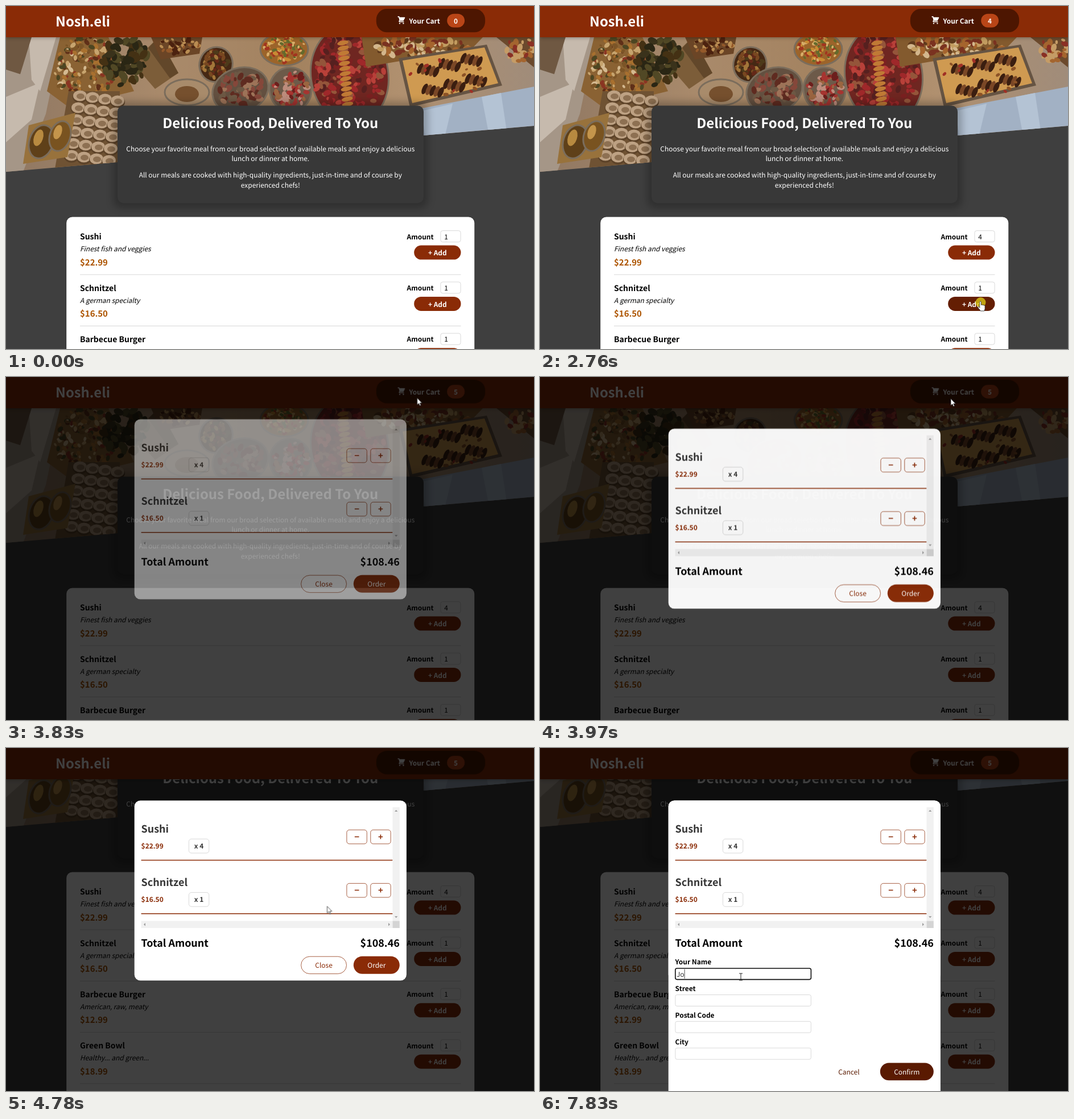
These frames come from a looping animation (928 px wide and 604 px high, 8000 ms). An HTML page:

```html
<!DOCTYPE html>
<html lang="en">
<head>
<meta charset="utf-8">
<title>Nosh.eli</title>
<style>
html, body { margin: 0; width: 928px; height: 604px; overflow: hidden; background: #3f3f3f; }
svg { display: block; }
text {
  font: 11.95px "Noto Sans CJK JP", "Noto Sans JP", "Noto Sans CJK SC", "Noto Sans", sans-serif;
  text-rendering: geometricPrecision; white-space: pre;
}
.b { font-weight: 700; }
.w { fill: #fff; }
.mid { text-anchor: middle; }
.end { text-anchor: end; }
.rust { fill: #8a2b06; }
.grey { fill: #363636; }
.h1 { font-size: 23.9px; font-weight: 700; }
.h2 { font-size: 17.92px; font-weight: 700; }
.h3 { font-size: 13.98px; font-weight: 700; }
.lg { font-size: 14.94px; font-weight: 700; }
.it { font-style: italic; }
.price { fill: #ad5502; }
.field { fill: #fff; stroke: #ccc; stroke-width: .75; }
.ring { fill: none; stroke: #101010; stroke-width: 1.6; }
.line { fill: none; stroke: #8a2b06; stroke-width: .75; }

/* one shared 8 s clock */
.t { animation: 8s step-end infinite; }
#scroll { animation: scroll 8s ease-in-out infinite; }
#modal { animation: drop 8s ease-out infinite; }
#cart { transform-origin: 746.5px 25.6px; animation: bump 8s ease-out infinite; }
#pointer { animation: move 8s ease-in-out infinite; }

@keyframes scroll { 0%, 55.6% { transform: none } 59.7%, 100% { transform: translateY(-153px) } }
@keyframes drop {
  0%, 46.7% { opacity: 0; transform: translateY(-35.9px) }
  50.2%, 100% { opacity: 1; transform: none }
}
@keyframes bump {
  0%, 35.75% { transform: scale(1) }
  36.125% { transform: scale(.9) }
  36.875% { transform: scale(1.1) }
  37.625% { transform: scale(1.15) }
  39.5%, 100% { transform: scale(1) }
}
@keyframes move {
  0% { transform: translate(960px, 660px); animation-timing-function: step-end }
  .375% { transform: translate(893px, 590px) }
  5.4% { transform: translate(784px, 440px) }
  8.875%, 21.75% { transform: translate(792px, 398px) }
  24.5%, 28.5% { transform: translate(772px, 434px) }
  31.375%, 36.5% { transform: translate(774px, 521px) }
  43.75%, 45.5% { transform: translate(726px, 30px) }
  46.7% { transform: translate(723px, 36px) }
  49.6%, 50% { transform: translate(722px, 38px) }
  55.25%, 67% { transform: translate(564.5px, 278.5px) }
  70.6%, 75.5% { transform: translate(649px, 384px) }
  77.1% { transform: translate(600px, 350px) }
  82.25%, 100% { transform: translate(353px, 403px) }
}
@keyframes arrow {
  0%, 7.1%, 29.3%, 37.6%, 46.7%, 72.5% { opacity: 1 }
  4.9%, 23.4%, 30.75%, 42.9%, 69.6%, 81% { opacity: 0 }
}
@keyframes hand {
  0%, 7.1%, 29.3%, 37.6%, 46.7%, 72.5% { opacity: 0 }
  4.9%, 23.4%, 30.75%, 42.9%, 69.6% { opacity: 1 }
}
@keyframes beam { 0% { opacity: 0 } 81% { opacity: 1 } }
@keyframes press {
  0%, 12.5%, 16%, 19.25%, 26.75%, 35.7%, 46.7%, 72.5%, 86% { opacity: 0 }
  11.5%, 15%, 18.25%, 25.5%, 34.4%, 46.2%, 71.25%, 84.75% { opacity: .78 }
}
@keyframes hover0 { 0%, 7.1%, 29.3% { fill: #8a2b06 } 4.9%, 23.4% { fill: #641e03 } }
@keyframes hover1 { 0%, 37.6% { fill: #8a2b06 } 30.75% { fill: #641e03 } }
@keyframes hoverCart { 0%, 46.7% { fill: #4d1601 } 42.9% { fill: #2c0d00 } }
@keyframes hoverOrder { 0%, 72.5% { fill: #8a2b06 } 69.6% { fill: #5a1a01 } }
@keyframes badge0 { 0% { opacity: 1 } 25.75% { opacity: 0 } }
@keyframes badge4 { 0%, 35.75% { opacity: 0 } 25.75% { opacity: 1 } }
@keyframes badge5 { 0% { opacity: 0 } 35.75% { opacity: 1 } }
@keyframes amount1 { 0% { opacity: 1 } 12% { opacity: 0 } }
@keyframes amount2 { 0%, 15.25% { opacity: 0 } 12% { opacity: 1 } }
@keyframes amount3 { 0%, 18.5% { opacity: 0 } 15.25% { opacity: 1 } }
@keyframes amount4 { 0% { opacity: 0 } 18.5% { opacity: 1 } }
@keyframes focusAmount { 0%, 25.5% { opacity: 0 } 11.5% { opacity: 1 } }
@keyframes dim { 0% { opacity: 0 } 46.7% { opacity: .75 } }
@keyframes form { 0% { opacity: 0 } 72.5% { opacity: 1 } }
@keyframes focusName { 0% { opacity: 0 } 84.75% { opacity: 1 } }
@keyframes caret {
  0% { opacity: 0 }
  85.2% { opacity: 1; transform: none }
  91.5% { opacity: 0 }
  95.95% { opacity: 1; transform: translateX(6.4px) }
  97.8% { opacity: 1; transform: translateX(13.6px) }
}
@keyframes typed1 { 0%, 97.8% { opacity: 0 } 95.95% { opacity: 1 } }
@keyframes typed2 { 0% { opacity: 0 } 97.8% { opacity: 1 } }
</style>
</head>
<body>
<svg width="928" height="604" viewBox="0 0 928 604">
  <defs>
    <clipPath id="tilt"><path d="M0 0H928V211L0 292Z"/></clipPath>
    <clipPath id="list"><rect x="237" y="104" width="443" height="200.5"/></clipPath>
    <linearGradient id="linen">
      <stop offset="0" stop-color="#8f7762"/><stop offset=".3" stop-color="#a98a6b"/>
      <stop offset=".55" stop-color="#a3825f"/><stop offset=".75" stop-color="#b0906f"/>
      <stop offset="1" stop-color="#a08c7a"/>
    </linearGradient>
  </defs>

  <g id="scroll">
    <g id="photo" clip-path="url(#tilt)"></g>
    <rect x="188.5" y="169" width="553" height="187" rx="14" opacity=".25" style="filter:blur(6.7px)"/>
    <rect x="196" y="175.5" width="538" height="171.7" rx="10.5" fill="#383838"/>
    <g class="w mid">
      <text class="h1" x="464.8" y="215">Delicious Food, Delivered To You</text>
      <text x="464.8" y="255.8">Choose your favorite meal from our broad selection of available meals and enjoy a delicious</text>
      <text x="464.8" y="273">lunch or dinner at home.</text>
      <text x="464.8" y="302.4">All our meals are cooked with high-quality ingredients, just-in-time and of course by</text>
      <text x="464.8" y="319.6">experienced chefs!</text>
    </g>
    <rect x="106" y="372.2" width="717.5" height="397" rx="10.5" opacity=".2" style="filter:blur(1.5px)"/>
    <rect x="106.2" y="371.4" width="717.1" height="397" rx="10.5" fill="#fff"/>
    <g id="meals"></g>
  </g>

  <rect y="-10" width="928" height="66" opacity=".3" style="filter:blur(3px)"/>
  <rect width="928" height="55" fill="#8a2b06"/>
  <text class="h1 w" x="87" y="35.6">Nosh.eli</text>
  <g id="cart">
    <rect class="t" style="animation-name:hoverCart" x="650.8" y="4.9" width="191.3" height="41.4" rx="18.7" fill="#4d1601"/>
    <path class="w" transform="translate(686.7 17.3) scale(.807)" d="M3 1a1 1 0 000 2h1.22l1.673 6.694-.893.892C3.74 11.846 4.632 14 6.414 14H15a1 1 0 000-2H6.414l1-1H14a1 1 0 00.894-.553l3-6A1 1 0 0017 3H6.28l-.31-1.243A1 1 0 005 1H3zM16 16.5a1.5 1.5 0 11-3 0 1.5 1.5 0 013 0zM6.5 18a1.5 1.5 0 100-3 1.5 1.5 0 000 3z"/>
    <text class="b w" x="708.5" y="30.8">Your Cart</text>
    <rect x="775.2" y="13.7" width="30.9" height="24" rx="12" fill="#b94517"/>
    <g class="w mid">
      <text class="b t" style="animation-name:badge0" x="790.6" y="30.8">0</text>
      <text class="b t" style="animation-name:badge4" x="790.6" y="30.8">4</text>
      <text class="b t" style="animation-name:badge5" x="790.6" y="30.8">5</text>
    </g>
  </g>

  <rect class="t" style="animation-name:dim" width="928" height="604"/>

  <g id="modal">
    <rect x="225.7" y="92.4" width="478.2" height="317.1" rx="10.5" fill="#fff"/>
    <g id="order">
      <rect class="line" x="518.6" y="367.2" width="79.9" height="30.4" rx="15.2"/>
      <text class="rust mid" x="558.6" y="387.2">Close</text>
      <rect class="t" style="animation-name:hoverOrder" x="610.8" y="366.8" width="81" height="31" rx="15.5" fill="#8a2b06"/>
      <text class="w mid" x="651.3" y="387.2">Order</text>
    </g>
    <g class="t" style="animation-name:form">
      <rect x="225.7" y="92.4" width="478.2" height="530" rx="10.5" fill="#fff"/>
      <g id="fields"></g>
      <rect class="ring t" style="animation-name:focusName" x="237.8" y="388" width="238.6" height="19.6" rx="3"/>
      <text class="t grey" style="animation-name:typed1" x="239.9" y="402.8">J</text>
      <text class="t grey" style="animation-name:typed2" x="239.9" y="402.8">Jo</text>
      <rect class="t" style="animation-name:caret" x="240" y="389.5" width=".8" height="16.5" fill="#222"/>
      <text class="mid" x="542.9" y="575.2" fill="#5a1a01">Cancel</text>
      <rect x="597.8" y="554.4" width="94" height="30.8" rx="15.4" fill="#5a1a01"/>
      <text class="w mid" x="644.7" y="575.2">Confirm</text>
    </g>
    <g id="items" clip-path="url(#list)"></g>
    <path fill="#f1f1f1" d="M679.5 104.3h12.3v200.2h-12.3zM237.6 304.5h441.9v12.5h-441.9z"/>
    <path fill="#d4d4d4" d="M679.5 304.5h12.3v12.5h-12.3z"/>
    <path fill="#9c9c9c" d="M683 112l2.7-3 2.7 3zM683 296.3l2.7 3 2.7-3zM245 308l-3 2.7 3 2.7zM672 308l3 2.7-3 2.7z"/>
    <text class="h2" x="237.6" y="349.6">Total Amount</text>
    <text class="h2 end" x="691.8" y="349.6">$108.46</text>
  </g>

  <g id="pointer">
    <circle class="t" style="animation-name:press" r="9" cx=".5" cy="1" fill="#dcc814"/>
    <g fill="#fff" stroke="#222" stroke-width=".8" stroke-linejoin="round">
      <path class="t" style="animation-name:arrow" d="M0 .3V12.2L2.8 9.7 4.6 13.9 6.5 13.1 4.7 9H8.4Z"/>
      <path class="t" style="animation-name:hand" d="M-1.2.2c0-1.6 2.6-1.6 2.6 0v5.5c.3-1 2.3-.9 2.4.2.4-.8 2.2-.6 2.3.5.5-.7 2-.4 2 .9v4.2c0 2-1 2.7-1.2 4.5H0c-.5-2.2-3.8-4.6-4.3-6.3-.4-1.3 1.2-1.8 2-.8l1.1 1.4z"/>
    </g>
    <path class="t" style="animation-name:beam" d="M-3-6H3M0-6V6M-3 6H3" fill="none" stroke="#222"/>
  </g>
</svg>
<script>
const fill = (id, html) => document.getElementById(id).innerHTML = html;

// Menu rows
const meals = [
  ['Sushi', 'Finest fish and veggies', '$22.99'],
  ['Schnitzel', 'A german specialty', '$16.50'],
  ['Barbecue Burger', 'American, raw, meaty', '$12.99'],
  ['Green Bowl', 'Healthy... and green...', '$18.99'],
];
const amounts = [1, 2, 3, 4].map(n =>
  `<text class="t" style="animation-name:amount${n}" x="770.3" y="410.8">${n}</text>`).join('') +
  '<rect class="ring t" style="animation-name:focusAmount" x="763.4" y="395.3" width="36.2" height="20.6" rx="4"/>';

fill('meals', meals.map(([name, note, price], i) => `
  <g transform="translate(0 ${i * 90.35})">
    <text class="h3" x="130" y="411.4">${name}</text>
    <text class="it" x="130" y="432.4">${note}</text>
    <text class="lg price" x="130" y="456.8">${price}</text>
    <rect x="130" y="472.6" width="669.5" height=".8" fill="#ccc"/>
    <text class="b end" x="751.5" y="410.8">Amount</text>
    <rect class="field" x="763.9" y="395.6" width="35.2" height="20" rx="3.7"/>
    ${i ? '<text x="770.3" y="410.8">1</text>' : amounts}
    <rect class="t" ${i < 2 ? `style="animation-name:hover${i}"` : ''} x="717.2" y="421.6" width="82.3" height="25" rx="12.5" fill="#8a2b06"/>
    <text class="b w mid" x="758.3" y="439.2">+ Add</text>
  </g>`).join(''));

// Cart lines
const step = (x, sign) => `
  <rect class="line" x="${x}" y="144.2" width="35.4" height="24.6" rx="4.5"/>
  <text class="lg rust mid" x="${x + 17.7}" y="162">${sign}</text>`;

fill('items', meals.slice(0, 2).map(([name, , price], i) => `
  <g transform="translate(0 ${i * 94.2})">
    <text class="h2 grey" x="237.6" y="148.7">${name}</text>
    <text class="b rust" x="237.6" y="177.3">${price}</text>
    <rect class="field" x="321.4" y="160.2" width="35.4" height="24.8" rx="4.5"/>
    <text class="b grey mid" x="339.1" y="177.3">x ${i ? 1 : 4}</text>
    ${step(598.9, '−')}${step(640.8, '+')}
    <rect x="237.6" y="196.8" width="442" height="1.5" fill="#8a2b06"/>
  </g>`).join(''));

fill('fields', ['Your Name', 'Street', 'Postal Code', 'City'].map((label, i) => `
  <g transform="translate(0 ${i * 46.85})">
    <text class="b" x="237.6" y="381">${label}</text>
    <rect class="field" x="237.9" y="387.7" width="238.4" height="20" rx="3"/>
  </g>`).join(''));

// Buffet backdrop in flat shapes
let seed = 7;
const rnd = () => (seed = seed * 16807 % 2147483647) / 2147483647;
const oval = (x, y, rx, ry, color, turn = 0, extra = '') =>
  `<ellipse cx="${x}" cy="${y}" rx="${rx}" ry="${ry}" fill="${color}" transform="rotate(${turn} ${x} ${y})" ${extra}/>`;
const shape = (d, color) => `<path d="${d}" fill="${color}"/>`;
const bits = (x, y, rx, ry, n, size, colors) => Array.from({ length: n }, () => {
  const a = rnd() * 6.283, r = Math.sqrt(rnd()), s = size * (.6 + rnd() * .8);
  return oval(x + rx * r * Math.cos(a), y + ry * r * Math.sin(a), s, s * .65,
    colors[Math.floor(rnd() * colors.length)], rnd() * 180);
}).join('');
const rim = 'stroke="#7b6d5c" stroke-width="3"';
const cups = Array.from({ length: 24 }, (_, i) => {
  const x = 130 + i % 4 * 22 - Math.floor(i / 4) * 3, y = 160 + Math.floor(i / 4) * 21 + i % 4 * 3;
  return oval(x, y, 13, 11, '#5d4329') + oval(x, y - 2, 12, 9.5, '#bda183') + oval(x + 1, y - 1, 7, 5, '#8d7052');
}).join('');
const roll = (x, y) => Array.from({ length: 5 }, (_, i) =>
  oval(x - 14 + i * 7, y - 3 + i * 1.5, 4.5, 10, i % 2 ? '#7a4726' : '#3b1e10', 24)).join('');
const rolls = [0, 1, 2].map(k => roll(742 + k * 38, 113 - k * 9) + roll(750 + k * 38, 149 - k * 9)).join('');

fill('photo',
  '<rect width="928" height="300" fill="url(#linen)"/>' +
  shape('M0 55H98L70 190 30 292H0Z', '#a59687') +
  shape('M40 55H88L60 150 45 130ZM0 160L60 135 45 200 0 240Z', '#c6baad') +
  shape('M0 55H45L25 120 0 112Z', '#6f5842') +
  shape('M95 55H180L225 150 110 178 72 150Z', '#8a6233') +
  bits(142, 112, 56, 58, 190, 4.5, ['#a8702f', '#5f2f18', '#c7a46e', '#8a3522', '#4d4622', '#d4b990', '#7c5527']) +
  shape('M222 100L268 55 303 118 262 146Z', '#7c5d39') +
  shape('M268 55L303 118 288 127 250 74Z', '#62472a') +
  bits(210, 98, 40, 42, 70, 8, ['#3a321b', '#2a2614', '#514825', '#443114']) +
  shape('M255 55H345L340 84 272 94Z', '#6b4526') +
  bits(302, 70, 36, 14, 45, 4.5, ['#4c220f', '#94592a', '#b98c52']) +
  oval(318, 152, 39, 23, '#a88b6b', 0, rim) + oval(318, 155, 21, 14, '#76502e') +
  oval(369, 103, 29, 31, '#452814', 20, rim) + bits(369, 103, 24, 25, 60, 4, ['#784720', '#a3763a', '#642818', '#4d3a1a']) +
  oval(489, 76, 42, 29, '#9c642a', 0, rim) + bits(490, 75, 36, 24, 90, 3.5, ['#c98a33', '#a2341f', '#646a2c', '#d7ad68']) +
  oval(412, 148, 50, 39, '#635040', -18, rim) + bits(412, 147, 41, 30, 70, 6, ['#85473a', '#5f2b20', '#9d7358', '#6d5844']) +
  oval(500, 147, 37, 39, '#6d5a49', -10, rim) + bits(500, 147, 30, 32, 75, 5, ['#a63430', '#bd8c7c', '#6c1f1c', '#9b6540']) +
  oval(604, 122, 68, 87, '#6f2621', -8, rim) + bits(604, 122, 62, 80, 190, 6, ['#9f282a', '#7a2020', '#b84039', '#56201f', '#94553a']) +
  Array.from({ length: 14 }, (_, i) => oval(592 + i * .7, 65 + i * 9, 10, 4, '#c07a35', -12)).join('') +
  shape('M625 55H838L818 76 633 107Z', '#835a2e') +
  bits(728, 72, 84, 17, 95, 5.5, ['#c29c60', '#7a3220', '#a5642d', '#d3b68c', '#5f3a1c']) +
  shape('M690 92L845 68 872 140 710 178Z', '#665443') +
  shape('M697 96L841 73 865 136 714 171Z', '#cf9a51') + rolls +
  bits(780, 122, 70, 34, 14, 3.5, ['#a03025', '#8c5226']) +
  shape('M862 55H928V108Z', '#6c4a2d') + bits(904, 76, 24, 22, 30, 5.5, ['#a4652f', '#8a3024', '#c59c66']) +
  shape('M690 188L928 142V230L690 250Z', '#a2b1c4') +
  shape('M730 185L785 172 770 235 738 235ZM836 160L870 153 880 220 848 222Z', '#b4c3d4') +
  shape('M110 150H200V292H85Z', '#6f5233') + cups +
  shape('M40 210L122 188 108 266 30 278Z', '#98723c') +
  oval(62, 239, 21, 30, '#5f4019', 18, rim) + oval(95, 229, 18, 27, '#795320', 18, rim) +
  oval(57, 232, 8, 15, '#b88a40', 18) + oval(91, 222, 7, 13, '#c4954b', 18));
</script>
</body>
</html>
```
